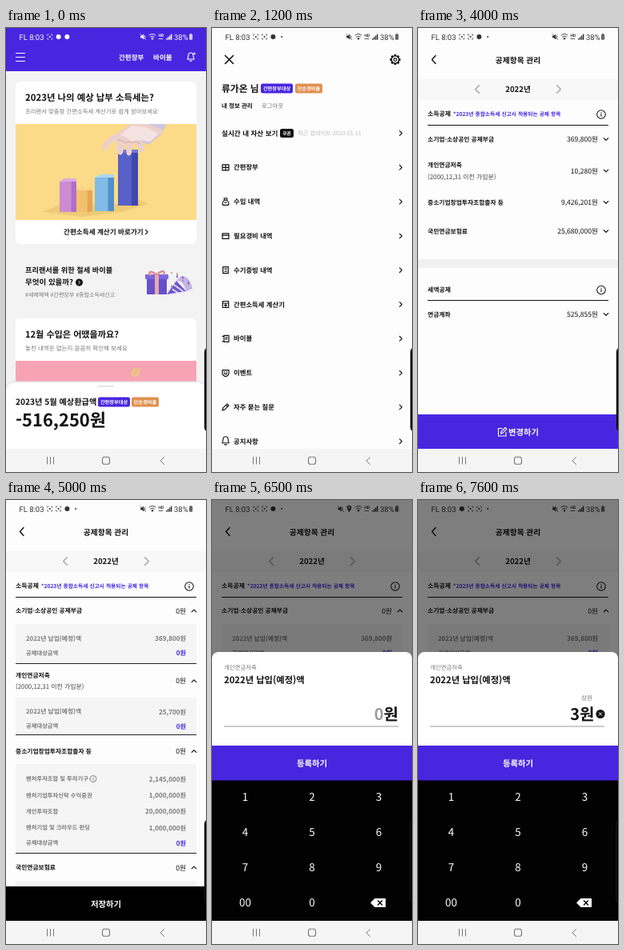
Write an HTML page that moves like this. It is 250x555 px and loops after 8000 ms.

```html
<!DOCTYPE html>
<html lang="ko">
<head>
<meta charset="utf-8">
<title>공제항목 관리</title>
<style>
html, body { margin: 0; width: 100%; height: 100%; overflow: hidden; background: #fff; }
svg { display: block; width: 100vw; height: 100vh; }
text { font-family: "Noto Sans CJK KR", "Noto Sans CJK", "Noto Sans", sans-serif; white-space: pre; text-rendering: geometricPrecision; }
text.sys { font-family: Roboto, sans-serif; }
</style>
</head>
<body>
<svg id="stage" viewBox="0 0 250 555"></svg>
<script>
const INK = '#111', BLUE = '#4726df', ORANGE = '#df9050';

// Drawing helpers return SVG markup; text is placed by its vertical centre.
const text = (x, cy, size, str, o = {}) =>
  `<text x="${x}" y="${(cy + size * .37).toFixed(2)}" font-size="${size}" font-weight="${o.w || 700}" fill="${o.c || INK}" text-anchor="${o.a || 'start'}" class="${o.k || ''}">${str}</text>`;
const rect = (x, y, w, h, fill, r = 0) => `<rect x="${x}" y="${y}" width="${w}" height="${h}" rx="${r}" fill="${fill}"/>`;
const circle = (x, y, r, fill) => `<circle cx="${x}" cy="${y}" r="${r}" fill="${fill}"/>`;
const shape = (d, fill) => `<path d="${d}" fill="${fill}"/>`;
const line = (d, c = INK, w = 1.2) =>
  `<path d="${d}" fill="none" stroke="${c}" stroke-width="${w}" stroke-linecap="round" stroke-linejoin="round"/>`;
const at = (x, y, body) => `<g transform="translate(${x} ${y})">${body}</g>`;
const group = (id, body) => `<g id="${id}">${body}</g>`;
const chevron = (x, y, dx, dy, c = INK, w = 1.2) => dx
  ? line(`M${x - dx / 2} ${y - Math.abs(dx)}l${dx} ${Math.abs(dx)}l${-dx} ${Math.abs(dx)}`, c, w)
  : line(`M${x - Math.abs(dy)} ${y - dy / 2}l${Math.abs(dy)} ${dy}l${Math.abs(dy)} ${-dy}`, c, w);
const info = (x, y, r = 5.3, c = INK) =>
  line(`M${x - r} ${y}a${r} ${r} 0 1 1 ${2 * r} 0a${r} ${r} 0 1 1 ${-2 * r} 0M${x} ${y - r * .12}v${r * .55}`, c, r / 5) + circle(x, y - r * .45, r * .13, c);
const badge = (x, cy, w, fill, str, size = 6.2, h = 12) =>
  rect(x, cy - h / 2, w, h, fill, 2.5) + text(x + w / 2, cy, size, str, { c: '#fff', a: 'middle' });

const frameIcon = (x, c) => at(x, 11, line('M-3 -1.700V-3H-1.700M1.700 -3H3V-1.700M3 1.700V3H1.700M-1.700 3H-3V1.700', c, .7) + circle(0, 0, 1.1, c));

function status(c, marks, pin) {
  let s = text(16.5, 11, 9.5, 'FL 8:03', { c, w: 400, k: 'sys' });
  [...marks].forEach((m, i) => {
    const x = 54.8 + i * 10.8;
    s += m === 'f' ? frameIcon(x, c) : circle(x, 11, m === 'o' ? 3 : 1, c);
  });
  s += at(pin ? 161 : 171.5, 11, shape('M-3.500 -1.300h1.800l2.400 -2.200v7l-2.400 -2.200h-1.800z', c) + line('M-3.600 -3.400L3.400 3.500M2 -1.500q1 1.500 0 3', c, .8));
  if (pin) s += `<path d="M171.500 15.300C170 12.500 168.700 11 168.700 9.500a2.800 2.800 0 0 1 5.600 0C174.300 11 173 12.500 171.500 15.300zM171.500 8.500a1 1 0 1 0 .01 0z" fill="${c}" fill-rule="evenodd"/>`;
  s += at(183, 11, line('M-4 -2q4 -3.300 8 0M-2.500 0q2.500 -2 5 0', c, .9) + circle(0, 2.3, 1.2, c));
  s += text(190.5, 9.5, 5, 'HD', { c, w: 700, k: 'sys' }) + line('M191 13.500h5', c, .8);
  for (let i = 0; i < 4; i++) s += rect(200 + i * 2, 13 - i * 1.8, 1.4, 1.7 + i * 1.8, c);
  return s + text(210, 11, 9.5, '38%', { c, w: 400, k: 'sys' }) +
    `<g opacity=".75">${rect(229, 7.7, 4.2, 7, c, 1) + rect(230.2, 6.8, 1.8, 1, c)}</g>`;
}

const nav = rect(0, 526, 250, 29, '#f5f5f5') +
  line('M51.500 536.500v8.500M55.500 536.500v8.500M59.500 536.500v8.500', '#777', 1) +
  `<rect x="120.500" y="536.300" width="9" height="9" rx="2.600" fill="none" stroke="#777" stroke-width="1.100"/>` +
  line('M197.500 536.500L193 541l4.500 4.500', '#777', 1);

const bell = (c) => line('M-4.300 2.500C-3 1 -3.400 -1 -3 -2.500a3 3 0 0 1 6 0C3.400 -1 3 1 4.300 2.500zM-1.300 4.300q1.300 1.200 2.600 0', c, 1.1);

function bar(x, y, w, h, front, side, top) {
  return rect(x, y, w * .68, h, front) + rect(x + w * .68, y, w * .32, h, side) +
    shape(`M${x} ${y}l${w * .3} -4h${w * .7}v4z`, top);
}

function homePage() {
  let s = rect(0, 0, 250, 526, '#f3f3f4') + rect(0, 0, 250, 54, BLUE) + status('#fff', 'foo');
  s += line('M12.500 31.500h11M12.500 36.500h11M12.500 41.500h11', '#fff', 1.2);
  s += text(141, 36.5, 8.5, '간편장부', { c: '#fff' }) + text(184, 36.5, 8.6, '바이블', { c: '#fff' });
  s += at(231, 36.5, bell('#fff')) + circle(235.5, 32, 1.2, '#fff');

  s += rect(12, 67, 226, 203, '#fff', 6);
  s += text(24, 87, 11.4, '2023년 나의 예상 납부 소득세는?');
  s += text(24, 104, 7.35, '프리랜서 맞춤형 간편소득세 계산기로 쉽게 알아보세요', { c: '#777', w: 400 });
  s += rect(12, 120, 226, 120, '#fbdb87');
  s += shape('M46 230L68 220h72l26 -6l12 6l-34 10l-50 6z', '#efcb76');
  s += bar(67, 192, 21, 38, '#cd8bd4', '#b06fca', '#dfa9e4');
  s += bar(88, 203, 20, 27, '#f3c06c', '#e5a456', '#f9d48a');
  s += bar(111, 187, 24, 42, '#80bce6', '#4f8fcd', '#a8d8f2');
  s += bar(140, 156, 25, 66, '#5960c8', '#4048ac', '#7379d8');
  s += shape('M157 120h44l-7 13l-16 13l-20 -8z', '#cfc6dc');
  s += shape('M156 120L138 132q-14 6 -17 15q-1 6 3 6q4 -1 5 -8l11 -5q-4 9 0 17q4 4 6 -1l2 -13q2 8 3 15q4 4 6 -2l1 -14q5 4 9 12q4 4 6 -2q-1 -7 -5 -12l16 -2q8 -3 14 -10l-22 -8z', '#ecd0cc');
  s += shape('M158 122l-16 12q10 2 14 8l10 -2l14 2q6 -4 10 -10l-14 -8z', '#f4e3e0');
  s += line('M140 140q6 0 9 3M150 143q4 -2 8 0M159 143q5 -2 9 2', '#c9a0a8', .9);
  s += text(72, 255, 8.6, '간편소득세 계산기 바로가기') + chevron(175.8, 255, 2.6, 0);

  s += text(24, 303, 9.2, '프리랜서를 위한 절세 바이블') + text(24, 317.5, 9.5, '무엇이 있을까?');
  s += circle(91.5, 318, 4.5, INK) + chevron(91.7, 318, 1.8, 0, '#fff', .9);
  s += text(24, 333, 7, '#세제혜택 #간편장부 #종합소득세신고', { c: '#777', w: 400 });
  s += rect(176, 313, 25, 20, '#6650cd', 1) + rect(174, 308, 29, 6, '#7b66dd', 1) + rect(186, 308, 5, 25, '#e6a9a8');
  s += line('M188 308q-11 -7 -8 1M189 308q9 -8 9 0', '#dd8f94', 2.4);
  s += shape('M201 333l12 -17l12 13z', '#6f58cc') + shape('M213 316q9 -1 12 13l8 -3q-3 -16 -14 -16z', '#c3b5ea');
  s += line('M207 326l8 5M210 321l11 8', '#e9dcf7', 1.6);
  for (let i = 0; i < 14; i++)
    s += rect(206 + i * 7 % 28, 305 + i * 5 % 22, 2, 2, ['#e79c78', '#6a55d8', '#a88fe0'][i % 3], .6);

  s += rect(12, 363, 226, 120, '#fff', 6);
  s += text(24, 383, 11.1, '12월 수입은 어땠을까요?');
  s += text(24, 400, 7.5, '놓친 내역은 없는지 꼼꼼히 확인해 보세요', { c: '#777', w: 400 });
  s += rect(12, 416, 226, 60, '#f8a3b3') + shape('M156.500 432q2 -8 10 -7q3 6 -3.500 11q-5 1 -6.500 -4z', '#eec58a');
  s += line('M160 434l5 -8', '#d9a566', .8);

  s += rect(0, 441.5, 250, 30, '#e4e4e6', 10) + rect(0, 443, 250, 90, '#fff', 10) + rect(115, 447, 20, 1.6, '#ddd', .8);
  s += text(12, 467.5, 10.2, '2023년 5월 예상환급액');
  s += badge(115, 467.5, 40, BLUE, '간편장부대상') + badge(157, 467.5, 34, ORANGE, '단순경비율');
  return s + text(12, 490, 21.9, '-516,250원');
}

const icons = [
  line('M-4 -3.500h8v7h-8zM0 -3.500v7M-4 0h8'),
  line('M-1.500 -2L-2 -4.300h4L1.500 -2C5 1 4.500 4.300 2 4.300h-4C-4.500 4.300 -5 1 -1.500 -2zM-1.500 -2h3M-1.200 1h2.400', INK, 1.1),
  line('M-4 -3h8v6.500h-8zM-4 -.8h8'),
  line('M-3.300 -4h6.600v8h-6.600zM-1 -1.500h2.200M-1 1.500h2.200'),
  line('M-3.700 -4h7.400v8h-7.400zM-3.700 -1.500h7.400M-1.500 1.200h3M0 -1.500v5'),
  line('M-4 -3h2v6.500h-2M-2 -4h6v8h-6zM0 -1.500h2M0 .5h2'),
  line('M-4 -3.500h8V1Q3 4 0 4.500Q-3 4 -4 1zM-1.700 .5q1.700 2 3.400 0M-1.500 -1.400v.2M1.500 -1.400v.2'),
  line('M-4 4l.8 -3L2 -4l2 2l-5.200 5.200zM.5 -2.500l2 2'),
  at(0, -.5, bell(INK)),
  line('M-3.500 -4h7v8h-7zM-1.500 -1h3M-1.500 1.300h3')
];
const labels = ['간편장부', '수입 내역', '필요경비 내역', '수기증빙 내역', '간편소득세 계산기', '바이블', '이벤트', '자주 묻는 질문', '공지사항', '공제항목 관리'];

function menuPage() {
  let list = text(12, 75.5, 11.8, '류가온 님') + badge(61, 75.5, 40, BLUE, '간편장부대상') + badge(104, 75.5, 34, ORANGE, '단순경비율');
  list += text(12, 97, 7.5, '내 정보 관리') + text(62, 97, 7.4, '로그아웃', { w: 400, c: '#777' });
  list += text(12, 131.5, 8.6, '실시간 내 자산 보기') + badge(85, 131.5, 17, INK, '쿠폰', 5.8, 11);
  list += text(107, 131.5, 7.2, '최근 업데이트 2023.01.11', { w: 400, c: '#bbb' }) + chevron(236, 131.5, 2.8, 0);
  labels.forEach((str, i) => {
    const y = 174.3 + i * 42.8;
    list += at(17, y, icons[i]) + text(27, y, 8.4, str) + chevron(236, y, 2.8, 0);
  });
  let gear = '';
  for (let i = 0; i < 8; i++) gear += `<rect x="-1.400" y="-6.600" width="2.800" height="3" rx=".6" fill="${INK}" transform="rotate(${i * 45})"/>`;
  gear += `<circle r="4.600" fill="#fff" stroke="${INK}" stroke-width="1.300"/><circle r="1.800" fill="none" stroke="${INK}" stroke-width="1.200"/>`;
  return rect(0, 0, 250, 526, '#fdfdfd') + group('list', list) + rect(0, 0, 250, 54, '#fdfdfd') +
    status('#333', 'ffo.') + line('M16.500 34.500l10 10M26.500 34.500l-10 10', INK, 1.6) + at(229, 39.5, gear);
}

function pageTop() {
  return rect(0, 0, 250, 526, '#fdfdfd') + line('M22 34.500L17.500 39.500l4.500 5', INK, 1.4) +
    text(125, 40, 9.75, '공제항목 관리', { a: 'middle' }) + rect(0, 64, 250, 26, '#f8f8f8') +
    chevron(74, 76.5, -4.6, 0, '#aaa', 1.5) + chevron(176, 76.5, 4.6, 0, '#aaa', 1.5) +
    text(125, 76.6, 9.6, '2022년', { a: 'middle' }) + text(12, 107.5, 7.9, '소득공제') +
    text(44, 107.5, 6.75, '*2023년 종합소득세 신고시 적용되는 공제 항목', { c: BLUE }) +
    info(229, 108) + rect(12, 121, 226, 1, INK);
}

function row(y, name, value, open, sub) {
  const gap = sub ? 7.2 : 0;
  return text(12, y - gap, 7.75, name) + (sub ? text(12, y + gap, 7.9, sub, { w: 400, c: '#444' }) : '') +
    text(225, y, 8.6, value + '원', { a: 'end', w: 400 }) + chevron(235, y, 0, open ? -2.8 : 2.8);
}

const bigButton = (y, fill, str) => rect(0, y, 250, 43.5, fill) + text(125, y + 22, 10.4, str, { c: '#fff', a: 'middle' });
const OLD = '(2000,12,31 이전 가입분)';

function viewPage() {
  return pageTop() + status('#333', 'ffo.') +
    row(139, '소기업·소상공인 공제부금', '369,800') +
    row(178.5, '개인연금저축', '10,280', 0, OLD) +
    row(218, '중소기업창업투자조합출자 등', '9,426,201') +
    row(254, '국민연금보험료', '25,680,000') +
    rect(0, 289, 250, 11, '#f1f1f1') + text(12, 327.5, 7.9, '세액공제') + info(229, 327.5) +
    rect(12, 340, 226, 1, INK) + row(358, '연금계좌', '525,855') +
    rect(0, 483, 250, 43.5, BLUE) + text(113, 505, 10.3, '변경하기', { c: '#fff' }) +
    line('M105 500.500h-4.500v9.500h9.500v-4.500M103.500 507l.6 -2.500l5 -5l1.800 1.800l-5 5z', '#fff', 1.1);
}

function box(y, h, lines) {
  let s = rect(12, y, 226, h, '#f5f5f5') + rect(12, y + h, 226, 1, '#222');
  lines.forEach(([cy, name, value]) => {
    const c = value === '0' ? BLUE : '#7a7a7a';
    s += text(25, cy, /\d/.test(name) ? 7.75 : 7.3, name, { c: '#7a7a7a' }) + text(225, cy, 8.1, value + '원', { a: 'end', c });
  });
  return s;
}

const PAY = '2022년 납입(예정)액', SUM = '공제대상금액';

function editPage() {
  return pageTop() + group('stA', status('#333', 'ffo.')) + group('stB', status('#333', 'ffo.', true)) + group('stC', status('#333', 'off.')) +
    row(138.5, '소기업·소상공인 공제부금', '0', 1) +
    box(155, 49, [[173, PAY, '369,800'], [191, SUM, '0']]) +
    row(226.3, '개인연금저축', '0', 1, OLD) +
    box(247, 46, [[264.5, PAY, '25,700'], [282.5, SUM, '0']]) +
    row(314, '중소기업창업투자조합출자 등', '0', 1) +
    box(330, 111, [[348.5, '벤처투자조합 및 투자기구', '2,145,000'], [369, '벤처기업투자신탁 수익증권', '1,000,000'],
      [389, '개인투자조합', '20,000,000'], [409.5, '벤처기업 및 크라우드 펀딩', '1,000,000'], [428.5, SUM, '0']]) +
    info(109, 348.5, 4, '#666') + row(459.5, '국민연금보험료', '0', 1) +
    rect(12, 476, 226, 10, '#f5f5f5') + bigButton(483, '#000', '저장하기');
}

function sheet() {
  let s = rect(0, 190, 250, 40, '#fff', 8) + rect(0, 205, 250, 103, '#fff');
  s += text(15, 209, 7.4, '개인연금저축', { w: 400, c: '#777' }) + text(15, 224.5, 11.3, PAY);
  s += rect(15, 282.5, 218, 1, '#999');
  s += group('empty', text(233, 268, 20, '<tspan fill="#999">0</tspan>원', { a: 'end' }));
  s += group('typed', text(218, 247.5, 7.6, '삼원', { a: 'end', w: 400, c: '#777' }) + text(220.5, 268, 20, '3원', { a: 'end' }) +
    circle(228, 267.5, 5.6, INK) + line('M226.200 265.700l3.600 3.600M229.800 265.700l-3.600 3.600', '#fff', 1));
  s += rect(0, 350, 250, 176, '#020202') + bigButton(307, BLUE, '등록하기');
  ['1', '2', '3', '4', '5', '6', '7', '8', '9', '00', '0'].forEach((key, i) =>
    s += text([41.5, 125, 208.5][i % 3], 371 + Math.floor(i / 3) * 44, 13.4, key, { c: '#fff', w: 400, a: 'middle' }));
  return s + shape('M198 503.500l5.500 -5.500h13.500v11h-13.500z', '#fff') + line('M207.500 501l5 5M212.500 501l-5 5', '#000', 1.5);
}

document.getElementById('stage').innerHTML =
  group('home', homePage()) + group('menu', menuPage()) + group('view', viewPage()) + group('edit', editPage()) +
  nav + group('dim', rect(0, 0, 250, 555, '#000')) + group('tap', circle(224.5, 266.5, 6.5, '#fff')) +
  group('sheet', sheet()) + group('nav', nav) +
  `<path d="M251 400.500h-1q-2 1 -2 5v93q0 4 2 5h1z" fill="#000" stroke="#444" stroke-width=".4"/>`;

// Steps: time, x, y, opacity.
const LOOP = 8000, TICK = 100;
const tracks = {
  menu: [[100, -250, 0, 1], [300, -190, 0, 1], [500, -70, 0, 1], [700, -14, 0, 1], [900, 0, 0, 1]],
  list: [[1900, 0, 0, 1], [2100, 0, -28, 1], [2300, 0, -42.8, 1]],
  view: [[2700, 40, 0, 0], [2900, 16, 0, .5], [3200, 0, 0, 1]],
  edit: [[4200, 0, 0, 0], [4600, 0, 0, 1]],
  dim: [[5700, 0, 0, 0], [5900, 0, 0, .26], [6200, 0, 0, .5]],
  tap: [[5700, 0, 0, 0], [5800, 0, 0, .35], [5900, 0, 0, .25], [6000, 0, 0, 0]],
  sheet: [[5700, 0, 130, 0], [5900, 0, 75, .34], [6000, 0, 30, .7], [6100, 0, 8, .92], [6200, 0, 0, 1]],
  nav: [[5900, 0, 0, 0], [6200, 0, 0, 1]]
};
const shows = { stA: [0, 5200], stB: [5200, 7000], stC: [7000, LOOP], empty: [0, 7100], typed: [7100, LOOP] };
const el = id => document.getElementById(id);

function sample(steps, t) {
  const i = steps.findIndex(s => s[0] > t);
  if (i === 0) return steps[0];
  if (i < 0) return steps[steps.length - 1];
  const a = steps[i - 1], b = steps[i], k = (t - a[0]) / (b[0] - a[0]);
  return a.map((v, n) => v + (b[n] - v) * k);
}

function draw(now) {
  const t = Math.floor(now % LOOP / TICK) * TICK;
  for (const id in tracks) {
    const [, x, y, alpha] = sample(tracks[id], t);
    el(id).setAttribute('transform', `translate(${x} ${y})`);
    el(id).setAttribute('opacity', alpha);
  }
  // Opacity hides whole screens; visibility switches parts inside them.
  for (const id in shows) el(id).setAttribute('visibility', t >= shows[id][0] && t < shows[id][1] ? 'visible' : 'hidden');
}

const start = performance.now();
function loop() {
  draw(performance.now() - start);
  requestAnimationFrame(loop);
}
loop();
</script>
</body>
</html>
```
